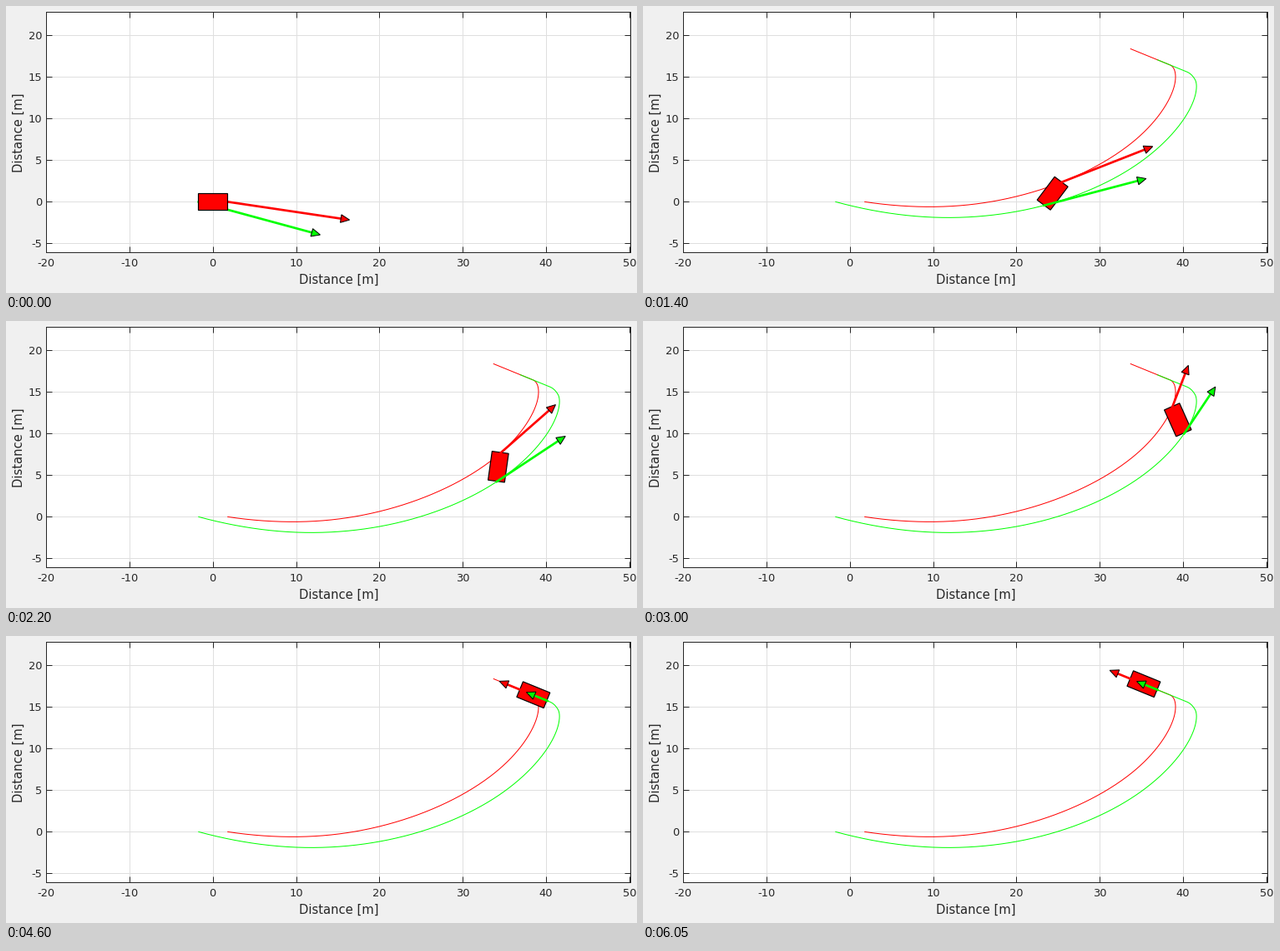
Recreate the animation shown at these times as a matplotlib script. Size 756 by 345 pixels, loop 6100 ms.

```python
import numpy as np
import matplotlib.pyplot as plt
from matplotlib.animation import FuncAnimation
from matplotlib.transforms import Affine2D

W, H, FRAMES = 756, 345, 122
INK, RED, GREEN = "#262626", "#ff0000", "#00ff00"
SCALE = 9.98            # pixels per metre
X0, Y0 = 247.75, 234.9  # pixel position of the data origin
LENGTH, HALF_W = 3.5, 1.0
ARROW_GAIN = 13.93      # arrow metres per metre travelled in one step
SUB = 10                # path samples per step

# step, front axle x [m], y [m], heading [deg]
KEYS = np.array([
    (0, 1.75, 0.00, 0.0),
    (12, 13.10, -0.46, 23.6),
    (27, 25.39, 2.37, 53.1),
    (43, 34.52, 7.71, 82.1),
    (59, 38.67, 13.23, 114.0),
    (64, 39.02, 14.54, 124.5),
    (77, 38.41, 16.48, 149.2),
    (88, 37.20, 16.97, 157.7),
])
START_RATE = np.array([0.975, -0.146, 1.97])
END_RATE = np.array([-0.1103, 0.0452, 0.0])


def clamped_spline(t, t_keys, p, rate0, rate1):
    """Cubic spline with given end slopes, continued straight after the end."""
    h = np.diff(t_keys)
    d = np.diff(p, axis=0) / h[:, None]
    n = len(t_keys)
    a, b = np.eye(n), np.zeros_like(p)
    b[0], b[-1] = rate0, rate1
    for i in range(1, n - 1):
        u, v = 1 / h[i - 1], 1 / h[i]
        a[i, i - 1:i + 2] = u, 2 * (u + v), v
        b[i] = 3 * (d[i - 1] * u + d[i] * v)
    m = np.linalg.solve(a, b)
    k = np.clip(np.searchsorted(t_keys, t, side="right") - 1, 0, n - 2)
    hk = h[k][:, None]
    s = np.clip((t - t_keys[k])[:, None] / hk, 0, 1)
    out = ((1 + 2 * s) * (1 - s) ** 2 * p[k] + s * (1 - s) ** 2 * hk * m[k]
           + s * s * (3 - 2 * s) * p[k + 1] + s * s * (s - 1) * hk * m[k + 1])
    return out + np.maximum(t - t_keys[-1], 0)[:, None] * rate1


# The front axle runs straight while the rear still swings into line.
steps = np.arange((FRAMES - 2) * SUB + 1) / SUB
front = clamped_spline(steps, KEYS[:-1, 0], KEYS[:-1, 1:3], START_RATE[:2], END_RATE[:2])
yaw = np.radians(clamped_spline(steps, KEYS[:, 0], KEYS[:, 3:], START_RATE[2:], END_RATE[2:]))
ahead = np.hstack([np.cos(yaw), np.sin(yaw)])
rear = front - LENGTH * ahead

plt.rcParams.update({"font.family": "DejaVu Sans", "axes.unicode_minus": False})
fig = plt.figure(figsize=(W / 72, H / 72), dpi=72, facecolor="#f0f0f0")
left, right, top, bottom = 48, 748, 7, 296
ax = fig.add_axes([left / W, 1 - bottom / H, (right - left) / W, (bottom - top) / H])
ax.set_xlim((left - X0) / SCALE, (right - X0) / SCALE)
ax.set_ylim((Y0 - bottom) / SCALE, (Y0 - top) / SCALE)
ax.set_xticks(range(-20, 51, 10))
ax.set_yticks(range(-5, 21, 5))
ax.set_axisbelow(True)
ax.grid(color="#dfdfdf", lw=1)
ax.tick_params(direction="in", top=True, right=True, length=7, width=1,
               color=INK, labelcolor=INK, labelsize=13)
ax.tick_params(axis="x", pad=7)
ax.tick_params(axis="y", pad=5)
for spine in ax.spines.values():
    spine.set(color=INK, linewidth=1)

label = dict(ha="center", va="center", color=INK, fontsize=14.8)
fig.text(398.5 / W, 1 - 329 / H, "Distance [m]", **label)
fig.text(15 / W, 1 - 152 / H, "Distance [m]", rotation=90, **label)

# Smooth lines go through pixel centres, like the snapped grid.
centred = ax.transData + Affine2D().translate(0.5, -0.5)
paths = [ax.plot(*p.T, color=c, lw=1, zorder=2.6, transform=centred)[0]
         for p, c in ((front, RED), (rear, GREEN))]
car, = ax.fill([0], [0], fc=RED, ec="black", lw=1.2, joinstyle="miter")


class Arrow:
    def __init__(self, points, color, z):
        self.points = points
        self.speed = np.gradient(points, 1 / SUB, axis=0)
        self.shaft, = ax.plot([], [], color=color, lw=2.7, zorder=z,
                              solid_capstyle="projecting", transform=centred)
        self.head, = ax.fill([0], [0], fc=color, ec="black", lw=1,
                             joinstyle="miter", zorder=z + 0.1, transform=centred)

    def place(self, k):
        a, v = self.points[k], self.speed[k]
        u = v / np.hypot(*v)
        side = 0.48 * np.array([-u[1], u[0]])
        b = a + ARROW_GAIN * v
        self.shaft.set_data(*np.array([a, b]).T)
        self.head.set_xy([b + side, b + 1.05 * u, b - side])


arrows = [Arrow(front, RED, 4), Arrow(rear, GREEN, 4.5)]


def draw(i):
    k = max(i - 1, 0) * SUB
    for p in paths:
        p.set_visible(i > 0)
    across = HALF_W * np.array([-ahead[k, 1], ahead[k, 0]])
    car.set_xy([front[k] + across, front[k] - across,
                rear[k] - across, rear[k] + across])
    car.set_zorder(3 if i else 6)   # the car covers its arrows only at rest
    for arrow in arrows:
        arrow.place(k)
    return [*paths, car]


anim = FuncAnimation(fig, draw, frames=FRAMES, interval=50, repeat=True,
                     repeat_delay=0, blit=False)
plt.show()
```
